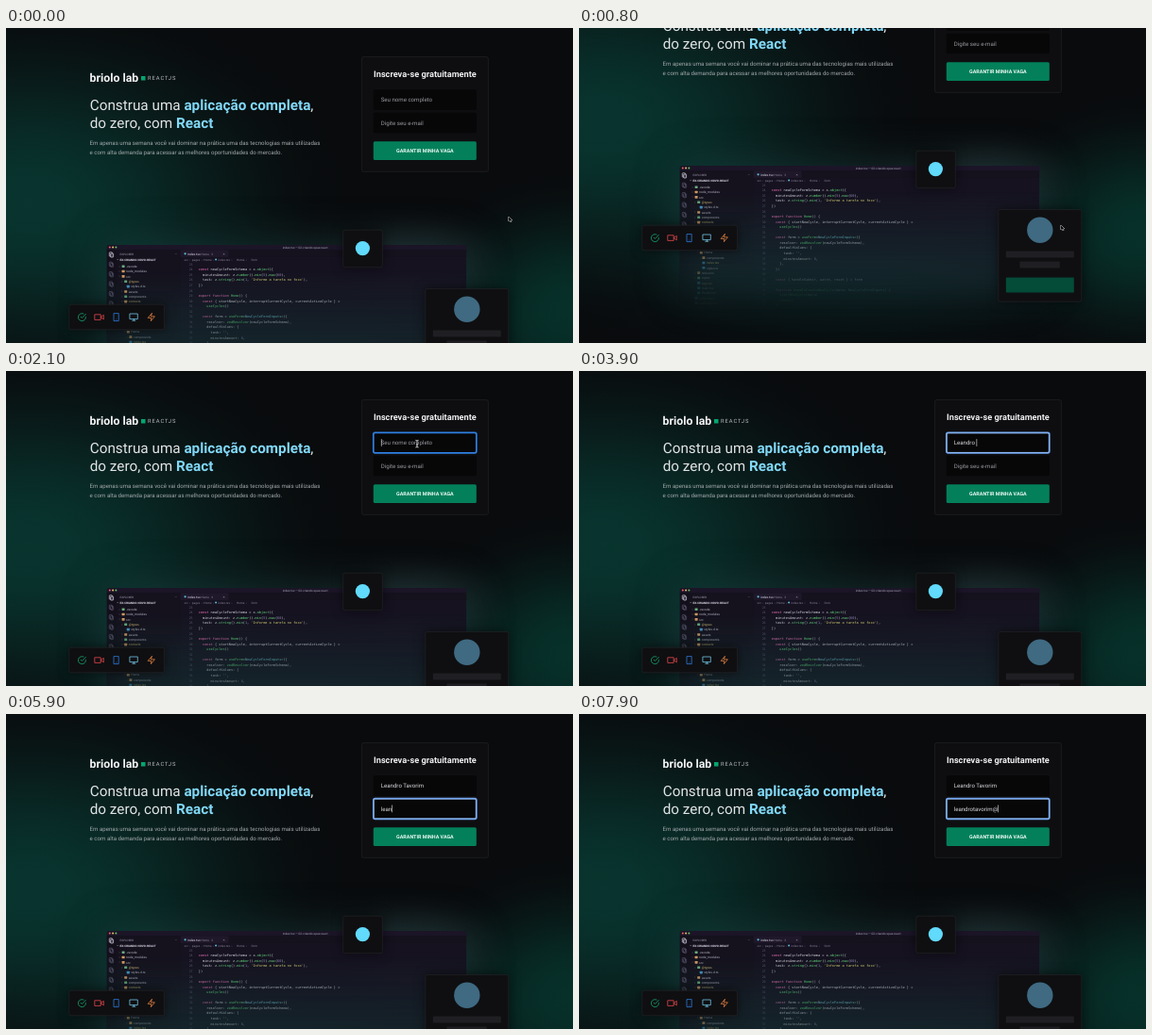
Animation, 600 px wide and 334 px high, one loop 8000 ms. Source, as an HTML page with a canvas:

```html
<!DOCTYPE html>
<html lang="pt-BR">
<head>
<meta charset="utf-8">
<title>Inscrição</title>
<style>
html, body { margin: 0; width: 100%; height: 100%; overflow: hidden; background: #09090a; }
canvas { display: block; width: 600px; height: 334px; }
</style>
</head>
<body>
<canvas id="stage"></canvas>
<script>
const W = 600, H = 334, PAGE_H = 430, LOOP = 8000;
const SANS = 'Roboto, Inter, sans-serif';
const MONO = '"DejaVu Sans Mono", "Noto Sans Mono", monospace';
const NAME = 'Leandro Tavorim', MAIL = 'leandrotavorim@';
const dpr = window.devicePixelRatio || 1;

function surface(canvas, w, h) {
  canvas.width = w * dpr;
  canvas.height = h * dpr;
  const c = canvas.getContext('2d');
  c.scale(dpr, dpr);
  c.textRendering = 'geometricPrecision';
  return c;
}

function text(c, str, x, y, size, color, weight = 400, family = SANS, align = 'left') {
  c.font = `${weight} ${size}px ${family}`;
  c.fillStyle = color;
  c.textAlign = align;
  c.fillText(str, x, y);
  return x + c.measureText(str).width;
}

function box(c, x, y, w, h, r, fill, stroke, line = 0.6) {
  c.beginPath();
  c.roundRect(x, y, w, h, r);
  if (fill) { c.fillStyle = fill; c.fill(); }
  if (stroke) { c.strokeStyle = stroke; c.lineWidth = line; c.stroke(); }
}

function disc(c, x, y, r, fill) {
  c.beginPath();
  c.arc(x, y, r, 0, 7);
  c.fillStyle = fill;
  c.fill();
}

function glow(c, x, y, rx, ry, rgb, alpha) {
  c.save();
  c.translate(x, y);
  c.scale(rx, ry);
  const g = c.createRadialGradient(0, 0, 0, 0, 0, 1);
  for (let i = 0; i <= 8; i++) {
    const a = alpha * (1 + Math.cos(Math.PI * i / 8)) / 2;
    g.addColorStop(i / 8, `rgba(${rgb},${a})`);
  }
  c.fillStyle = g;
  c.fillRect(-1, -1, 2, 2);
  c.restore();
}

// Blurred halo only: the casting rectangle lies outside the canvas.
function halo(c, x, y, w, h, blur, color) {
  c.save();
  c.shadowColor = color;
  c.shadowBlur = blur * dpr;
  c.shadowOffsetX = 2000 * dpr;
  c.fillStyle = '#000';
  c.fillRect(x - 2000, y, w, h);
  c.restore();
}

const CODE = [
  '', 'const newCycleFormSchema = z.object({', '  minutesAmount: z.number().min(5).max(60),',
  "  task: z.string().min(1, 'Informe a tarefa no foco'),", '})', '',
  'export function Home() {',
  '  const { startNewCycle, interruptCurrentCycle, currentActiveCycle } =',
  '    useCycles()', '',
  '  const form = useForm<NewCycleFormInputs>({', '    resolver: zodResolver(newCycleFormSchema),',
  '    defaultValues: {', "      task: '',", '      minutesAmount: 0,', '    },', '  })', '',
  '  const { handleSubmit, watch, reset } = form', '',
  '  function handleCreateNewCycle(data: NewCycleFormInputs) {', '    startNewCycle(data)', '    reset()', '  }'
];

const TREE = [
  [0, '.vscode'], [0, 'node_modules'], [0, 'src'], [1, '@types'], [2, 'styles.d.ts'], [1, 'assets'],
  [1, 'components'], [1, 'contexts'], [1, 'layouts'], [1, 'pages'], [2, 'History'], [3, 'index.tsx'],
  [3, 'styles.ts'], [2, 'Home'], [3, 'components'], [3, 'index.tsx'], [3, 'styles.ts'], [1, 'reducers'],
  [1, 'styles'], [1, 'App.tsx'], [1, 'main.tsx'], [1, 'Router.tsx'], [0, 'index.html'], [0, 'package.json']
];

function tint(word, next) {
  if (/^'/.test(word)) return '#e7de79';
  if (/^(const|export|function)$/.test(word)) return '#ff79c6';
  if (/^\d+$/.test(word)) return '#988bc7';
  if (next === '(' || next === '<') return '#67e480';
  if (/^[A-Z]/.test(word)) return '#78d1e1';
  return '#dedee6';
}

function codeLine(c, line, x, y) {
  const parts = line.match(/'[^']*'|\w+|\s+|[^\w\s]/g) || [];
  parts.forEach((p, i) => { x = text(c, p, x, y, 3.55, tint(p, parts[i + 1]), 400, MONO); });
}

function drawEditor() {
  const canvas = document.createElement('canvas');
  const c = surface(canvas, W, PAGE_H);
  c.translate(-0.4, -0.6);
  c.beginPath();
  c.roundRect(107, 230.5, 380.5, 180, 3);
  c.clip();
  c.fillStyle = '#161220';
  c.fillRect(107, 230, 381, 190);
  c.fillStyle = '#1b1527';
  c.fillRect(107, 230, 381, 6);
  c.fillStyle = '#13101b';
  c.fillRect(107, 236, 10, 180);
  c.fillStyle = '#15111d';
  c.fillRect(117, 236, 68, 180);
  c.fillRect(185, 236, 303, 7.5);
  c.fillStyle = '#1e182a';
  c.fillRect(185, 236, 51, 7.5);
  ['#f0616d', '#e8c267', '#67c46f'].forEach((f, i) => disc(c, 110.2 + i * 3.3, 233.2, 1, f));
  text(c, 'index.tsx — 02-criando-spas-react', 317, 234.4, 3.2, '#a9a6b3', 400, SANS, 'center');

  for (let i = 0; i < 6; i++) {
    const y = 238.4 + i * 10.4;
    const color = i ? '#5d5670' : '#d8d6df';
    box(c, 109.7, y, 3.2, 4.3, 0.6, null, color, 0.7);
    box(c, 111, y + 1.2, 3, 4, 0.6, i ? null : '#3d374c', color, 0.7);
  }

  text(c, 'EXPLORER', 121, 241.3, 3, '#a19daf');
  text(c, '…', 179, 240.5, 4, '#a19daf');
  text(c, '⌄', 117.5, 246.8, 3, '#d8d6df');
  text(c, 'EX-CRIANDO-NOVO-REACT', 121, 247.4, 3.05, '#dedbe8', 700);
  TREE.forEach(([depth, name], i) => {
    const x = 121 + depth * 2.6, y = 253.3 + i * 5.35;
    const file = name.includes('.') && name !== '.vscode';
    text(c, file ? '' : '›', x - 1, y + 1, 3.6, '#837d95');
    box(c, x + 2, y - 1.3, 3, 2.6, 0.4, file ? '#4796c9' : i % 3 ? '#d29a62' : '#68ad80');
    text(c, name, x + 6.5, y + 1.2, 3.35, i % 4 === 3 ? '#d5ba74' : '#bebaca');
  });

  disc(c, 190, 239.9, 1.1, '#61b9dc');
  text(c, 'index.tsx', 192.5, 241.1, 3.4, '#e2dfeb');
  text(c, 'Home   3', 207, 241.1, 3.1, '#958fa6');
  text(c, '×', 230, 241.2, 4, '#958fa6');
  text(c, 'src  ›  pages  ›  Home  ›', 189, 247.4, 3.1, '#898399');
  text(c, 'index.tsx  ›      Home  ›      form', 225, 247.4, 3.1, '#898399');
  disc(c, 222.5, 246.2, 1, '#61b9dc');

  CODE.forEach((line, i) => {
    const y = 252.4 + i * 5.55;
    text(c, String(23 + i), 198, y, 3.3, '#5e576f', 400, MONO, 'right');
    codeLine(c, line, 204.2, y);
  });

  const fade = c.createLinearGradient(0, 255, 0, 388);
  fade.addColorStop(0, 'rgba(0,0,0,0)');
  fade.addColorStop(0.5, 'rgba(0,0,0,0.45)');
  fade.addColorStop(0.8, 'rgba(0,0,0,0.86)');
  fade.addColorStop(1, '#000');
  c.globalCompositeOperation = 'destination-out';
  c.fillStyle = fade;
  c.fillRect(100, 255, 400, 175);
  return canvas;
}

function icon(c, x, y, color, path) {
  c.save();
  c.translate(x - 4.8, y - 4.8);
  c.scale(0.4, 0.4);
  c.strokeStyle = color;
  c.lineWidth = 1.9;
  c.lineCap = c.lineJoin = 'round';
  c.stroke(new Path2D(path));
  c.restore();
}

function card(c, x, y, w, h) {
  c.save();
  c.shadowColor = 'rgba(0,0,0,0.55)';
  c.shadowBlur = 12 * dpr;
  box(c, x, y, w, h, 2, '#0f0f11');
  c.restore();
  box(c, x, y, w, h, 2, null, '#27272b');
}

function drawPage() {
  const canvas = document.createElement('canvas');
  const c = surface(canvas, W, PAGE_H);
  c.fillStyle = '#090b0d';
  c.fillRect(0, 0, W, PAGE_H);
  glow(c, 25, 185, 340, 225, '8,86,74', 0.55);
  glow(c, 595, 300, 180, 150, '4,96,78', 0.44);
  glow(c, 290, 340, 330, 130, '8,58,60', 0.25);
  halo(c, 107, 231, 380, 130, 48, 'rgba(44,104,106,0.36)');
  glow(c, 430, 245, 120, 60, '74,100,106', 0.2);

  text(c, 'briolo lab', 88.5, 56.8, 12.3, '#f4f4f6', 700);
  c.fillStyle = '#04a56f';
  c.fillRect(143, 51, 4.5, 4.5);
  c.letterSpacing = '0.95px';
  text(c, 'REACTJS', 150, 55.2, 5.8, '#b9bcc0');
  c.letterSpacing = '0px';

  const white = '#e1e4e6', cyan = '#81d8f7';
  let x = text(c, 'Construa uma ', 88.7, 86.6, 15.3, white);
  x = text(c, 'aplicação completa', x, 86.6, 15.3, cyan, 700);
  text(c, ',', x, 86.6, 15.3, white);
  x = text(c, 'do zero, com ', 88.7, 105.7, 15.3, white);
  text(c, 'React', x, 105.7, 15.3, cyan, 700);
  const soft = '#a3a8ab';
  text(c, 'Em apenas uma semana você vai dominar na prática uma das tecnologias mais utilizadas', 88.6, 123.7, 6.12, soft);
  text(c, 'e com alta demanda para acessar as melhores oportunidades do mercado.', 88.6, 133.5, 6.12, soft);

  box(c, 376.4, 30.6, 134, 121.7, 2, '#0e0e10', '#28282c');
  text(c, 'Inscreva-se gratuitamente', 443.4, 52.1, 9.18, '#f0f0f2', 700, SANS, 'center');
  box(c, 388.8, 120.2, 109, 19.8, 1.5, '#03805a');
  text(c, 'GARANTIR MINHA VAGA', 443.4, 132.1, 5.36, '#eefaf5', 700, SANS, 'center');

  c.drawImage(drawEditor(), 0, 0, W, PAGE_H);

  card(c, 356.8, 214.2, 41.5, 39.5);
  disc(c, 377.4, 233.6, 7.6, '#61dafb');

  card(c, 66.8, 293.2, 100.6, 26.6);
  icon(c, 80.4, 306.6, '#13b377', 'M22 11v1a10 10 0 1 1-6-9.1M22 4 12 14l-3-3');
  icon(c, 98.6, 306.6, '#ee4b50', 'M1 5h15v14H1zM23 7l-7 5 7 5z');
  icon(c, 116.8, 306.6, '#2f7fe8', 'M6 2h12v20H6zM12 18h.1');
  icon(c, 135.3, 306.6, '#79cdf2', 'M2 3h20v14H2zM8 21h8M12 17v4');
  icon(c, 153.8, 306.6, '#ee8744', 'M13 2 3 14h9l-1 8 10-12h-9z');

  card(c, 443.8, 276.6, 88, 97.6);
  disc(c, 487.8, 298.3, 13.7, '#3f6a82');
  box(c, 451.8, 320.6, 72, 6.8, 1, '#1f1f23');
  box(c, 466.4, 331.6, 42.4, 6.8, 1, '#1f1f23');
  box(c, 451.8, 348.6, 72, 16, 1, '#044b38');
  return canvas;
}

const ease = p => p * p * (3 - 2 * p);
const span = (t, a, b) => ease(Math.min(1, Math.max(0, (t - a) / (b - a))));
const typed = (str, t, start, step) => str.slice(0, Math.max(0, Math.floor((t - start) / step) + 1));

const PATH = [[100, 532, 200], [750, 510, 209], [900, 510, 209], [1250, 496, 190], [1400, 496, 190], [1950, 435, 75]];

function pointer(t) {
  let [, x, y] = PATH[0];
  for (let i = 1; i < PATH.length; i++) {
    const [a, x0, y0] = PATH[i - 1], [b, x1, y1] = PATH[i];
    if (t >= a) {
      const p = span(t, a, b);
      x = x0 + (x1 - x0) * p;
      y = y0 + (y1 - y0) * p;
    }
  }
  return [x, y];
}

function field(c, y, value, hint, focused, t) {
  box(c, 388.8, y, 109, 21.6, 1.5, '#070708');
  if (focused) {
    box(c, 388.8, y, 109, 21.6, 1.8, null, t < 2500 ? '#2f80e2' : '#6da4ef', 1.7);
    if (t >= 2500) box(c, 389.4, y + 0.6, 107.8, 20.4, 1.3, null, '#c5dcfa', 0.4);
  }
  const end = text(c, value, 396.7, y + 12.9, 6.12, '#dadade');
  if (!value) text(c, hint, 396.7, y + 12.9, 6.12, '#98989f');
  if (focused) {
    c.fillStyle = '#e4e4e8';
    c.fillRect(end + 0.2, y + 6.8, 0.6, 7.8);
  }
}

function drawPointer(c, x, y) {
  c.save();
  c.translate(x, y);
  c.lineJoin = 'round';
  if (x > 388 && x < 498 && y > 65 && y < 112) {
    const beam = new Path2D('M-1.6 -1.6Q0 -1.6 0 -.6Q0 -1.6 1.6 -1.6M0 -.6V5M-1.6 6Q0 6 0 5Q0 6 1.6 6M-.9 3H.9');
    c.strokeStyle = '#111';
    c.lineWidth = 1.8;
    c.stroke(beam);
    c.strokeStyle = '#f2f2f2';
    c.lineWidth = 0.8;
    c.stroke(beam);
  } else {
    const arrow = new Path2D('M0 0V5L1.2 4L2 5.8L2.8 5.4L2.1 3.7H3.6Z');
    c.strokeStyle = '#d4d4d6';
    c.lineWidth = 1;
    c.stroke(arrow);
    c.fillStyle = '#0a0a0a';
    c.fill(arrow);
  }
  c.restore();
}

const ctx = surface(document.getElementById('stage'), W, H);
const page = drawPage();

function draw(t) {
  const scroll = Math.round(84 * (span(t, 50, 700) - span(t, 850, 1250)));
  ctx.save();
  ctx.translate(0, -scroll);
  ctx.drawImage(page, 0, 0, W, PAGE_H);
  const first = t >= 2000 && t < 5200;
  field(ctx, 65.3, typed(NAME, t, 2650, 170), 'Seu nome completo', first, t);
  field(ctx, 89.7, typed(MAIL, t, 5350, 180), 'Digite seu e-mail', t >= 5200, t);
  ctx.restore();
  if (t < 2650) drawPointer(ctx, ...pointer(t));
}

function tick(now) {
  draw(now % LOOP);
  requestAnimationFrame(tick);
}
requestAnimationFrame(tick);
</script>
</body>
</html>
```
